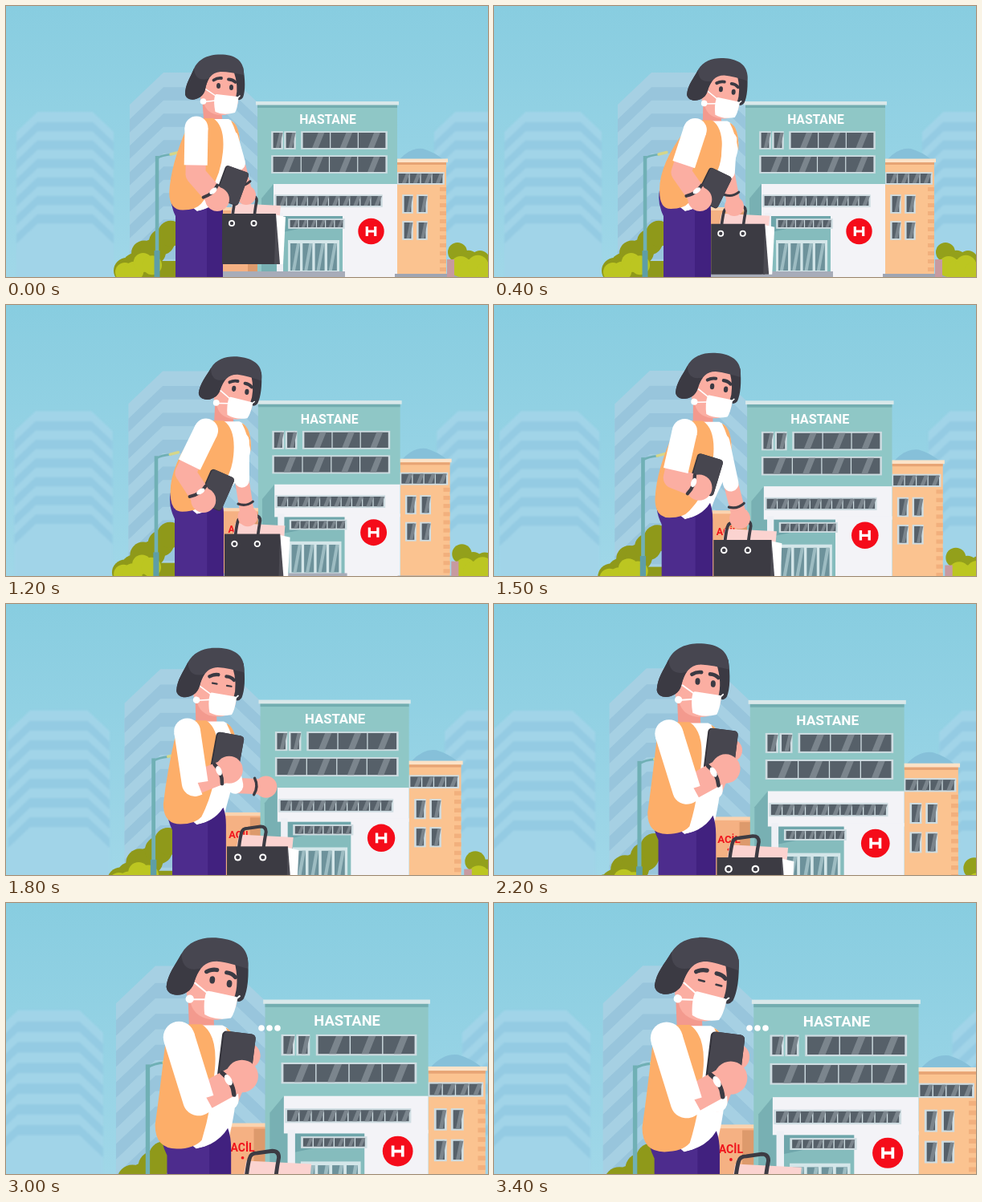
Animation of 600x338 px, one loop 3500 ms. Source, as an HTML page:

```html
<!DOCTYPE html>
<html lang="tr">
<head>
<meta charset="utf-8">
<style>
html, body { margin: 0; width: 100%; height: 100%; overflow: hidden; background: #8ccfe1; }
svg { display: block; width: 100vw; height: 100vh; }
.soft { filter: blur(.7px); }
.softer { filter: blur(1.2px); }
text { font-family: Roboto, Inter, sans-serif; font-weight: 700; text-anchor: middle; }
</style>
</head>
<body>
<svg viewBox="0 0 600 338" preserveAspectRatio="none">
  <defs>
    <linearGradient id="sky" x2="0" y2="1">
      <stop stop-color="#88cde0"/><stop offset="1" stop-color="#a0d7e8"/>
    </linearGradient>
  </defs>
  <rect width="600" height="338" fill="url(#sky)"/>
  <g class="softer"><g id="far"></g></g>
  <g class="soft"><g id="town"></g><g id="bushes"></g></g>
  <g id="front"></g>
  <g id="dots"></g>
</svg>
<script>
const LOOP = 3500, STEP = 100;
const SKIN = '#fbaea2', SHADE = '#f39a8e', HAIR = '#3b3a43', CAP = '#474650';
const DARK = '#3c3b43', ORANGE = '#fdae69', WHITE = '#fff', GLASS = '#566069';
const $ = id => document.getElementById(id);

// ---- markup helpers ----
const rect = (x, y, w, h, fill, extra = '') =>
  `<rect x="${x}" y="${y}" width="${w}" height="${h}" fill="${fill}" ${extra}/>`;
const path = (d, fill) => `<path d="${d}" fill="${fill}"/>`;
const line = (d, color, width, extra = 'stroke-linecap="round"') =>
  `<path d="${d}" fill="none" stroke="${color}" stroke-width="${width}" stroke-linejoin="round" ${extra}/>`;
const circle = ([x, y], r, fill) => `<circle cx="${x}" cy="${y}" r="${r}" fill="${fill}"/>`;
const repeat = (n, f) => Array.from({ length: n }, (_, i) => f(i)).join('');

// ---- scenery ----
function tower(x, y, w, slope, gap, count, base, stripe) {
  const run = slope * 1.05, right = x + w - run;
  const roof = top => `M${x},${top + slope} l${run},${-slope} H${right} l${run},${slope}`;
  return path(`${roof(y)} V420 H${x}z`, base) + repeat(count, i =>
    path(`${roof(y + gap * (i + .55))} v${gap / 2} l${-run},${-slope} H${x + run} l${-run},${slope}z`, stripe));
}

function windows(x, y, w, h, panes) {
  const pw = w / panes, g = Math.min(pw, h) * .4;
  return rect(x - 1.8, y - 1.8, w + 3.6, h + 3.6, '#cfdde2') + repeat(panes, i => {
    const px = x + i * pw;
    return rect(px + .6, y, pw - 1.2, h, GLASS) +
      path(`M${px + pw * .35},${y + h} l${g},${-h} h${g} l${-g},${h}z`, '#7b858d');
  });
}

function hospital() {
  return rect(313, 123, 174, 220, '#8fc7c6') +
    rect(313, 123, 174, 4, '#73adb0') + rect(311, 119, 178, 4.5, '#d9e8ea') +
    `<text x="400.5" y="147" font-size="15.7" fill="#fff">HASTANE</text>` +
    windows(332, 158, 11, 19, 1) + windows(348, 158, 11, 19, 1) +
    windows(369, 158, 104, 19, 3) + windows(332, 188, 141, 19, 4) +
    path('M333,222 L318,240 V340 H345 V240z', '#78b0b3') +
    rect(345, 256, 77, 84, '#85bcbd') + path('M345,262 H422 V266 L345,282z', '#6fa6ab') +
    rect(333, 222, 154, 40, '#f3f3f7') + rect(337, 258, 8, 80, '#eef0f5') +
    rect(419, 258, 68, 82, '#f3f3f7') +
    windows(336, 237, 131, 12, 10) + windows(353, 267, 67, 9, 6) +
    rect(351, 292, 64, 40, '#d4e6e9') +
    repeat(4, i => rect(354 + i * 15.3, 296, 12, 34, '#6d929b') +
      path(`M${356 + i * 15.3},330 l6,-34 h4 l-6,34z`, '#9dbcc2')) +
    circle([454.5, 281], 16.2, '#f50c1a') +
    line('M449.3,275 V287 M459.7,275 V287 M449.3,281 H459.7', WHITE, 3.2, '') +
    rect(270, 331, 152, 20, '#a7acb9') + rect(484, 334, 80, 20, '#9fa5b2');
}

function clinic() {
  return path('M489,192 q14,-16 30,-14 q14,4 26,14z', '#86c0d9') +
    rect(487, 193, 61, 150, '#fbc390') + rect(486, 190.5, 64, 4.5, '#fce3c8') +
    rect(487, 195, 61, 3, '#e7a474') +
    repeat(12, i => rect(540, 226 + i * 10, 8, 5, '#f2b07d')) +
    windows(488, 209, 56, 12, 4) +
    repeat(4, i => windows(495 + (i % 2) * 18, 237 + (i >> 1) * 33, 10, 20, 1));
}

const emergency = () =>
  rect(240, 254, 75, 90, '#f5b183') + rect(238, 251, 78, 4, '#fbd3af') +
  rect(301, 257, 14, 80, '#dd9a6c') +
  `<text x="289" y="281" font-size="12" fill="#f0141c">ACİL</text>` + circle([289, 288], 1.6, '#f0141c');

const lamp = () =>
  rect(185.8, 187, 4.5, 160, '#70b0b5') + rect(184.5, 305, 7, 40, '#5e9ea6') +
  line('M188,190 Q194,186 206,185', '#70b0b5', 2.6) + line('M205,185 L215,182.5', '#d5d68a', 3.4);

// Round leaves climbing from (x, y) towards (x + w, y - h).
const leaves = (n, x, y, w, h, r, color) => repeat(n, i => {
  const u = i / (n - 1);
  return circle([x + w * u, y - h * u + 4 * Math.sin(i * 2.4)], r, color);
});

$('far').innerHTML = [13, 533].map(x => tower(x, 132, 121, 25, 23, 6, '#a1d4e8', '#94cbe3')).join('');
$('town').innerHTML =
  tower(154, 83, 162, 40, 33, 7, '#a6d0e3', '#98c5dc') + clinic() + emergency() + hospital();
$('bushes').innerHTML =
  leaves(6, 150, 330, 55, 44, 16, '#8f991a') + rect(150, 318, 70, 40, '#8f991a') +
  leaves(4, 148, 332, 34, 12, 12, '#bcc621') + lamp() +
  leaves(3, 562, 307, 28, -14, 12, '#93a01b') + leaves(4, 566, 325, 32, -4, 13, '#bcc621') +
  rect(549, 316, 9, 25, '#c79aa0');

// ---- motion ----
const STAND = {
  head: [272, 122], shoulder: [237, 152], elbow: [236, 210], hand: [263, 241], phone: [281, 224],
  farElbow: [289, 196], farHand: [299, 236], bag: [-2, -21], turn: [0, 20],
};
const BEND = {
  head: [298, 130], shoulder: [259, 156], elbow: [231, 206], hand: [252, 241], phone: [268, 229],
  farElbow: [292, 215], farHand: [299, 259], bag: [0, 0], turn: [9, 30],
};
const READ = {
  head: [258, 122], shoulder: [222, 153], elbow: [240, 211], hand: [280, 189], phone: [275, 170.5],
  farElbow: [268, 211], farHand: [285, 170], bag: [0, 0], turn: [2, 7],
};

function ease(t, from, to) {
  const u = Math.min(1, Math.max(0, (t - from) / (to - from)));
  return u * u * (3 - 2 * u);
}
const mix = (a, b, u) => a.map((v, i) => v + (b[i] - v) * u);
const around = (x, y, k) => `translate(${x} ${y}) scale(${k}) translate(${-x} ${-y})`;

// She bends to put the bag down, straightens, then lifts the phone.
function poseAt(t) {
  const bend = ease(t, 0, 700), rise = ease(t, 700, 2150);
  const lift = ease(t, 1100, 2000), follow = ease(t, 1400, 2200), look = ease(t, 2500, 3400);
  const pace = { elbow: lift, hand: lift, phone: lift, farElbow: follow, farHand: follow };
  const p = {};
  for (const k in STAND) p[k] = mix(mix(STAND[k], BEND[k], bend), READ[k], pace[k] ?? rise);
  const drag = .75 * (p.shoulder[0] - BEND.shoulder[0]) * (1 - lift) * bend;
  if (t > 700) for (const k of ['elbow', 'hand', 'phone']) p[k][0] += drag;
  p.farHand[0] += 22 * Math.sin(Math.PI * follow);
  p.head[1] += 2 * look;
  p.turn[0] += 6 * look;
  p.cuff = 47 + 17 * lift;
  p.lean = (p.shoulder[0] - READ.shoulder[0]) / (BEND.shoulder[0] - READ.shoulder[0]);
  return p;
}

// ---- character ----
function head({ head: [x, y], turn: [tilt] }, blink) {
  const eye = (ex, ey) => blink
    ? line(`M${ex - 2.5},${ey} l5,.6`, HAIR, 1.9)
    : `<ellipse cx="${ex}" cy="${ey}" rx="2.5" ry="3.5" fill="${HAIR}"/>`;
  return `<g transform="translate(${x - 271} ${y - 122}) rotate(${tilt} 271 122)">` +
    path('M244,78 H288 V116 C288,130 278,136 268,136 C252,136 246,128 244,116z', SKIN) +
    circle([246, 114], 5, SKIN) +
    path('M282,80 L294,76 C297,92 297,106 294,114 Q290,120 285,115 Q289,100 282,80z', HAIR) +
    path('M233,78 C239,65 252,60.5 266,60.5 C284,60.5 296,68 295,86 C285,84 275,82 266,82 C255,83 250,90 247,104 C244,118 224,121 222,110 C222,98 228,90 233,78z', CAP) +
    path('M233,78 C228,90 222,98 222,110 C224,121 244,118 247,104 C248,98 250,93 252,90 C241,94 234,90 233,78z', HAIR) +
    line('M257.5,92.5 Q262,89.5 267,90 M276,91.5 Q281,91.5 284.5,95', HAIR, 3.8) +
    eye(263.5, 99.5) + eye(279.5, 101.5) +
    line('M260,112 L248,104 M259,118 L245,119.5 M287,115 L290,112', WHITE, 1.5) +
    circle([244.5, 119], 3.8, WHITE) +
    path('M261,110 L287,113 Q289,114 288,117 Q287,128 284,133 Q270,137 259.5,132 Q257,120 259,111.5 Q259.5,110 261,110z', WHITE) + '</g>';
}

function shirt({ shoulder: [x, y] }) {
  return path(`M${x - 4},${y - 11} H${x + 40} Q${x + 52},${y - 6} ${x + 54},${y + 16} C${x + 54},${y + 50} 274,222 268,246 L240,259 L215,240z`, WHITE) +
    path(`M${x + 43},${y - 9} Q${x + 55},${y - 4} ${x + 54},${y + 26} Q${x + 50},${y + 4} ${x + 43},${y - 9}z`, ORANGE);
}

function vest({ shoulder: [x, y], lean }) {
  const back = 200 + 8 * lean, hem = 256 - 4 * lean;
  return path(`M${x},${y - 12} H${x + 21} Q${x + 36},${y - 2} ${x + 33},${y + 30} Q${x + 30},${y + 66} 243,${hem - 8} Q236,${hem} 220,${hem} Q${back},${hem} ${back},${hem - 22} Q205,198 ${x - 12},${y}z`, ORANGE);
}

const legs = () =>
  path('M238,256 Q258,252 267,237 Q270,245 270,256 V370 H238z', '#41217f') +
  path('M206,230 L238,256 L250,253 V370 H211 V262 Q203,246 206,230z', '#4d2c8d');

const bag = p => `<g transform="translate(${p.bag})">` +
  path('M284,267 L344,270 L342,290 H280z', '#fbd3d0') +
  path('M336,281 L350,284 L347,343 H334z', WHITE) +
  rect(271, 280, 67, 63, DARK) + path('M338,280 L343,343 H336z', '#4c4b53') +
  line('M283,292 Q285,272 287,265 Q288,260 294,260 L308,258 Q314,258 314,264 Q311,280 310.5,292', DARK, 3.6) +
  [283, 310.5].map(x => circle([x, 292], 4, WHITE) + circle([x, 292], 2.2, DARK)).join('') + '</g>';

// Strap across a limb, optionally with a watch face.
function strap(a, b, at, half, width, face) {
  const angle = Math.atan2(b[1] - a[1], b[0] - a[0]) * 180 / Math.PI;
  return `<g transform="translate(${mix(a, b, at)}) rotate(${angle})">` +
    line(`M0,${-half} Q5,0 0,${half}`, DARK, width) +
    (face ? `<ellipse cx="2" cy="-3" rx="3" ry="5.5" fill="${WHITE}"/>` : '') + '</g>';
}

function farArm({ shoulder: [x, y], farElbow, farHand }) {
  return line(`M${farElbow} L${farHand}`, SKIN, 17) +
    line(`M${x + 43},${y + 12} L${farElbow}`, WHITE, 18) +
    circle(farHand, 12, SKIN) + strap(farElbow, farHand, .62, 9, 3);
}

function nearArm({ shoulder, elbow, hand, cuff }) {
  const d = `M${shoulder} L${elbow} L${hand}`;
  return line(d, SKIN, 25) +
    line(d, WHITE, 29, `pathLength="100" stroke-dasharray="${cuff} 200"`) +
    circle(shoulder, 14.5, WHITE) + circle(hand, 15, SKIN) + strap(elbow, hand, .68, 11.5, 4, true);
}

const phone = p => `<g transform="translate(${p.phone}) rotate(${p.turn[1]})">` +
  rect(-15.5, -22, 31, 44, '#34333b', 'rx="4"') + rect(-14, -22, 29.5, 43, '#47464f', 'rx="4"') + '</g>';

const neck = ({ head: [hx, hy], shoulder: [x, y] }) =>
  line(`M${hx - 16},${hy - 2} L${x + 21},${y - 6}`, SHADE, 23);

// ---- frame ----
function draw(ms) {
  const t = Math.floor((ms % LOOP) / STEP) * STEP;
  const zoom = .18 * ease(t, 700, 3450), p = poseAt(t);
  const blink = t % 1600 === 200;

  $('far').setAttribute('transform', around(243, 118, 1 + zoom * .72));
  $('town').setAttribute('transform', around(256, 110, 1 + zoom));
  $('bushes').setAttribute('transform', around(250, 110, 1 + zoom * 1.12));
  $('front').setAttribute('transform', around(241, 112, 1 + zoom * 2.1));
  $('front').innerHTML = neck(p) + shirt(p) + legs() + vest(p) + head(p, blink) +
    bag(p) + farArm(p) + phone(p) + nearArm(p);
  $('dots').innerHTML = repeat(3, i =>
    circle([318 + i * 10, 156], 3.8 * ease(t, 2500 + i * 60, 2750 + i * 60), WHITE));
}

const start = performance.now();
function tick() {
  draw(performance.now() - start);
  requestAnimationFrame(tick);
}
tick();
</script>
</body>
</html>
```
